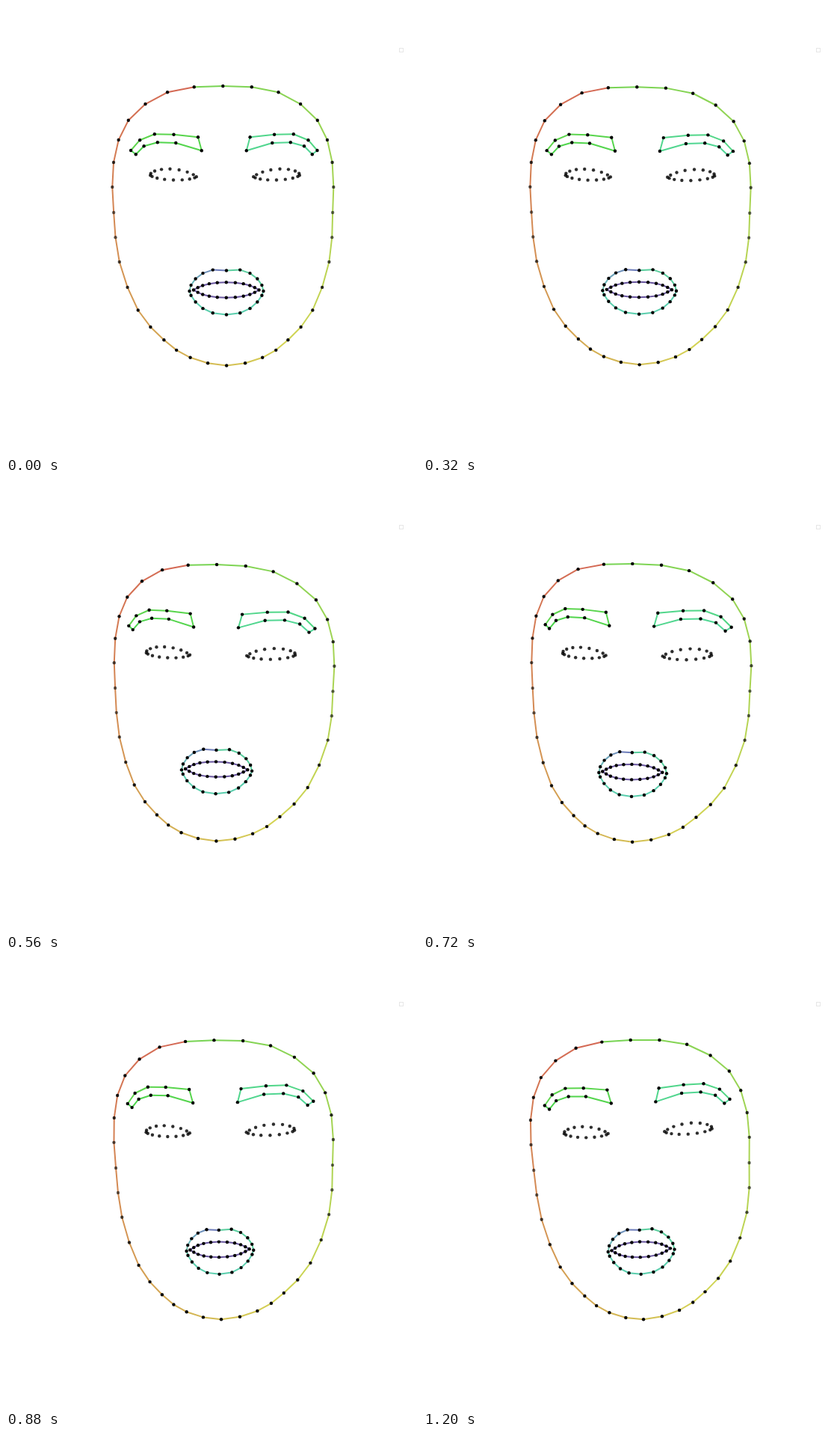
Write an HTML page with a canvas that moves like this. It is 550x600 px and loops after 1.28 s.

```html
<!DOCTYPE html>
<html lang="en">
<head>
<meta charset="utf-8">
<title>Face contours</title>
<style>
  html, body { margin: 0; width: 100%; height: 100%; overflow: hidden; background: #fff; }
  canvas { display: block; }
</style>
</head>
<body>
<canvas id="stage" width="550" height="600"></canvas>
<script>
const LOOP = 1280, STEP = 80;
const ctx = document.getElementById('stage').getContext('2d');

// Head turn and tilt in pixels at the key times.
const TIMES = [0, 160, 400, 560, 720, 880, 1200];
const YAW = [0, -1, -6.8, -11, -12.5, -9.5, -6.3];
const ROLL = [0, 0, 1, 2.2, 2, -1.9, -5];

const range = (n, f) => Array.from({ length: n }, (_, i) => f(i));
const bend = (v, p) => Math.sign(v) * Math.abs(v) ** p;

function hermite(a, b, ma, mb, u) {
  const v = 1 - u;
  return v * v * ((1 + 2 * u) * a + u * ma) + u * u * ((3 - 2 * u) * b - v * mb);
}

function track(keys, t) {
  const last = TIMES.length - 1;
  let n = 0;
  while (n < last - 1 && t >= TIMES[n + 1]) n++;
  const slope = j => {
    const a = Math.max(j - 1, 0), b = Math.min(j + 1, last);
    return (keys[b] - keys[a]) / (TIMES[b] - TIMES[a]);
  };
  const span = TIMES[n + 1] - TIMES[n];
  return hermite(keys[n], keys[n + 1], slope(n) * span, slope(n + 1) * span, (t - TIMES[n]) / span);
}

// Half outline from crown to chin: half-width and height of every second point.
const HALF = [[0, 107], [74.3, 115.3], [126.5, 152.8], [146.3, 209], [146.5, 276],
  [140.3, 342], [116.8, 406.5], [83, 446.3], [48.3, 469.8], [0, 480.5]];

function outline(i) {
  const k = i + 1, left = k <= 18, s = (left ? k : 36 - k) / 2;
  const n = Math.min(Math.floor(s), 8);
  const key = j => j < 0 ? [-HALF[1][0], HALF[1][1]] : j > 9 ? [-HALF[8][0], HALF[8][1]] : HALF[j];
  const [w, y] = [0, 1].map(a => {
    const p = j => key(n + j)[a];
    return hermite(p(0), p(1), (p(1) - p(-1)) / 2, (p(2) - p(0)) / 2, s - n);
  });
  return [290.3 + Math.max(0, y - 260) * .022 + (left ? -w : w), y];
}

// Distance from the nose line and height, outer corner first.
const BROW = [[124.7, 193], [112.7, 179.2], [93, 171.2], [67.3, 171.7], [34.8, 175.2],
  [30, 193.2], [64.5, 183], [89, 182.2], [107.2, 187.2], [118, 198.2]];
const brow = side => BROW.map(([x, y]) => [291.8 + side * x, y]);

const eye = side => range(16, i => {
  const a = i * Math.PI / 8, s = Math.sin(a);
  const x = 30.8 * Math.cos(a) + 4.5 * Math.max(0, s);
  return [293 + side * (69 + x), 227.2 - .03 * x - bend(s, 1.3) * (s > 0 ? 9.3 : 5.3)];
});

const outerLip = i => {
  const a = i * Math.PI / 10, s = Math.sin(a);
  const rise = s > 0 ? 30.5 * s ** 1.15 - 3 * s ** 40 : -31.5 * Math.abs(s) ** 1.45;
  return [295 - 49.5 * bend(Math.cos(a), .85), 381 - rise];
};

const innerLip = i => {
  const a = i * Math.PI / 10, c = Math.cos(a);
  return [294.8 - 43.8 * c * (.89 + .11 * c ** 30), 379.5 - 10.3 * Math.sin(a)];
};

// depth scales the head turn; lift and squeeze grow with the expression.
const dark = () => 1, soft = () => .82;
const parts = [
  { pts: range(36, outline), depth: 1, lift: 0,
    line: i => `hsl(${10 + 93 * (i / 35) ** 1.12} 60% 58%)`,
    shade: y => 1 - .42 * Math.exp(-(((y - 290) / 95) ** 2)) },
  { pts: brow(-1), depth: 1.13, lift: -2.7, line: i => `hsl(${112 + i} 62% 57%)`, shade: dark },
  { pts: brow(1), depth: 1.13, lift: -2.7, line: i => `hsl(${143 + i} 62% 58%)`, shade: dark },
  { pts: eye(-1), depth: .93, lift: 2.6, shade: soft },
  { pts: eye(1), depth: .93, lift: 2.6, shade: soft },
  { pts: range(20, outerLip), depth: 1.15, lift: 7.5, squeeze: .08,
    line: i => i < 5 ? `hsl(${168 + i * 15} 36% 58%)` : `hsl(${i < 10 ? 155 : 163} 54% 58%)`, shade: dark },
  { pts: range(20, innerLip), depth: 1.15, lift: 7.5, squeeze: .08,
    line: () => 'hsl(256 30% 48%)', shade: dark }
];

function pose(t) {
  const e = Math.min(1, Math.max(0, (t - 300) / 500));
  return {
    yaw: track(YAW, t),
    roll: track(ROLL, t),
    jaw: 9 * (t / 1200) ** 1.2,
    nod: 2.2 * Math.exp(-(((t - 500) / 230) ** 2)),
    mood: e * e * (3 - 2 * e)
  };
}

function move([x, y], part, { yaw, roll, jaw, nod, mood }) {
  const u = (x - 290) / 147, v = (y - 294) / 187;
  const turn = yaw * part.depth * (1 - Math.abs(u) ** 3);
  const cheek = jaw * Math.max(0, -u) * (.6 + .6 * v);
  const pinch = (part.squeeze || 0) * mood * (295 - x);
  return [x + turn + cheek + pinch - 1.25 * roll * v, y + roll * u - nod * v + part.lift * mood];
}

function draw(t) {
  ctx.fillStyle = '#fff';
  ctx.fillRect(0, 0, 550, 600);
  ctx.lineWidth = 1;
  ctx.strokeStyle = '#e6e6e6';
  ctx.strokeRect(526.5, 56.5, 5, 5);

  ctx.lineWidth = 2;
  ctx.lineCap = 'round';
  const now = pose(t);
  for (const part of parts) {
    const pts = part.pts.map(p => move(p, part, now));
    if (part.line) pts.forEach((p, i) => {
      ctx.strokeStyle = part.line(i);
      ctx.beginPath();
      ctx.moveTo(...p);
      ctx.lineTo(...pts[(i + 1) % pts.length]);
      ctx.stroke();
    });
    for (const [x, y] of pts) {
      ctx.fillStyle = `rgba(0, 0, 0, ${part.shade(y)})`;
      ctx.beginPath();
      ctx.arc(x, y, 2.2, 0, Math.PI * 2);
      ctx.fill();
    }
  }
}

const start = performance.now();
function tick() {
  const t = (performance.now() - start) % LOOP;
  draw(Math.floor(t / STEP) * STEP);
  requestAnimationFrame(tick);
}
tick();
</script>
</body>
</html>
```
